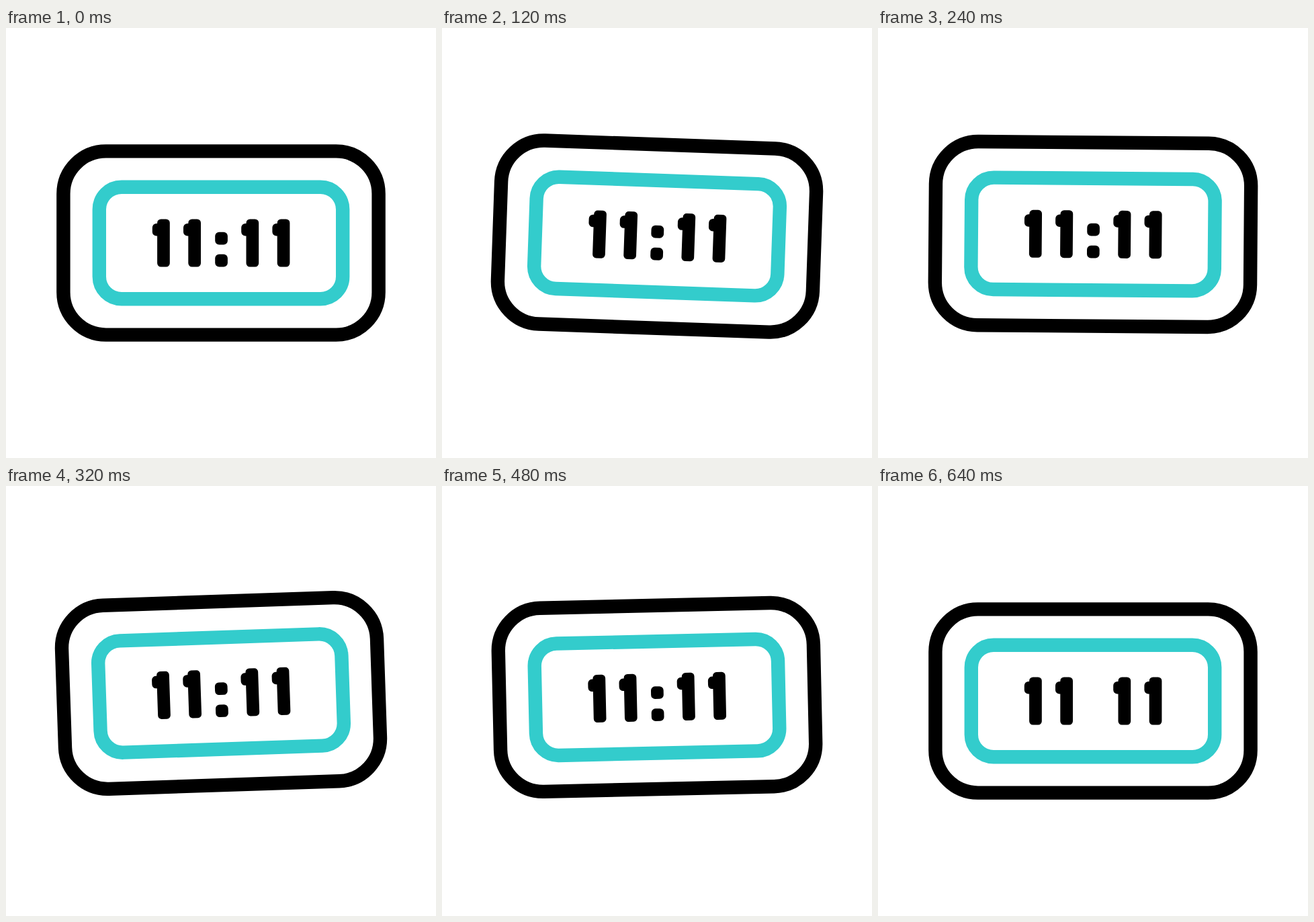
An HTML page that plays this animation: 640 px wide and 640 px high, repeating every 1200 ms.

```html
<!DOCTYPE html>
<html lang="en">
<head>
<meta charset="utf-8">
<title>Digital clock</title>
<style>
  html, body { margin: 0; width: 100%; height: 100%; overflow: hidden; background: #fff; }
  svg { display: block; width: 100%; height: 100%; }
</style>
</head>
<body>
<svg viewBox="0 0 640 640">
  <defs>
    <g id="one">
      <rect x="225.1" y="284.5" width="18.7" height="71" rx="5.5"/>
      <rect x="217.8" y="291" width="18" height="18.5" rx="6"/>
    </g>
  </defs>
  <g id="clock">
    <g fill="none" stroke-width="20.4">
      <rect x="85.4" y="183.4" width="469.2" height="273.2" rx="63.3" stroke="#000"/>
      <rect x="138.8" y="236.8" width="362.4" height="166.4" rx="33.2" stroke="#33cccc"/>
    </g>
    <use href="#one"/>
    <use href="#one" x="46.2"/>
    <use href="#one" x="132.4"/>
    <use href="#one" x="178.6"/>
    <g id="colon">
      <rect x="311.2" y="303.8" width="18.7" height="18.7" rx="6"/>
      <rect x="311.2" y="336.8" width="18.7" height="18.7" rx="6"/>
    </g>
  </g>
</svg>
<script>
const LOOP = 1200, STEP = 20, COLON_OFF = 600;

// Keys: [time in ms, value, slope per ms]
const TILT = [[0, 0, 0.021], [145, 2.1, 0], [240, 0.45, -0.036], [345, -2.15, 0], [640, 0, 0.002]];
const LIFT = [[0, 0, -0.01], [180, -13.25, 0], [320, -11.5, 0.03], [400, -8.5, 0.038], [640, 0, 0.034]];

const clock = document.getElementById('clock');
const colon = document.getElementById('colon');

// Cubic Hermite curve through the keys, holding the last value
function curve(keys, t) {
  const i = keys.findIndex(key => key[0] > t);
  if (i < 0) return keys[keys.length - 1][1];
  const [t0, v0, m0] = keys[i - 1];
  const [t1, v1, m1] = keys[i];
  const span = t1 - t0;
  const x = (t - t0) / span;
  const mix = x * x * (3 - 2 * x);
  return v0 + (v1 - v0) * mix
    + span * x * (1 - x) * (m0 * (1 - x) - m1 * x);
}

function draw(ms) {
  const t = Math.floor((ms % LOOP) / STEP + 0.001) * STEP;
  const lift = curve(LIFT, t).toFixed(3);
  const tilt = curve(TILT, t).toFixed(4);
  clock.setAttribute('transform', `translate(0 ${lift}) rotate(${tilt} 320 320)`);
  colon.setAttribute('visibility', t < COLON_OFF ? 'visible' : 'hidden');
}

let start;
function tick(now) {
  if (start === undefined) start = now;
  draw(Math.max(0, now - start));
  requestAnimationFrame(tick);
}
draw(0);
requestAnimationFrame(tick);
</script>
</body>
</html>
```
